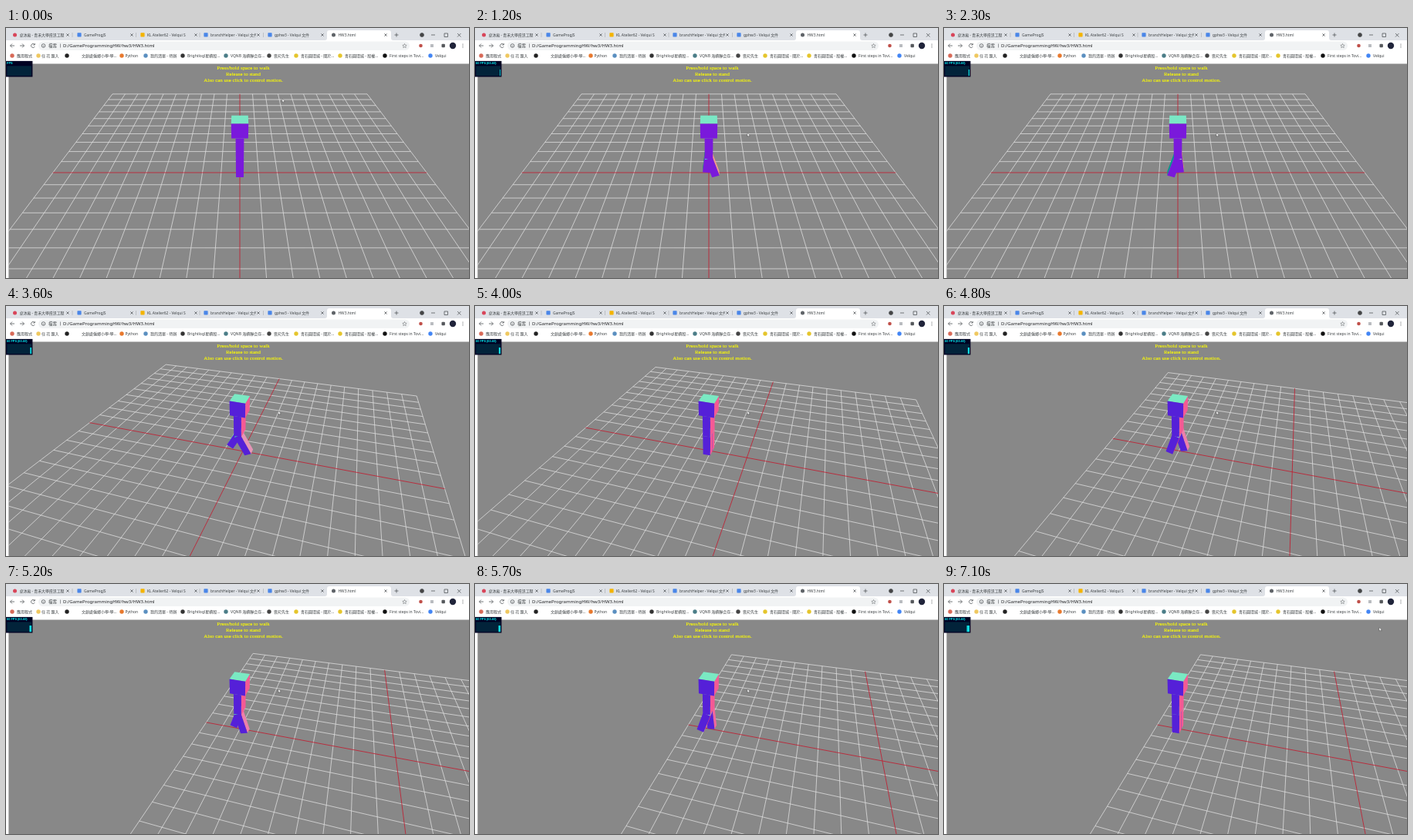
An HTML page with a canvas that plays this animation: 600x325 px, repeating every 7.2 s.

```html
<!DOCTYPE html>
<html lang="zh-Hant">
<head>
<meta charset="utf-8">
<title>HW3</title>
<style>
html, body { margin: 0; width: 600px; height: 325px; overflow: hidden; background: #fff; }
canvas, svg { position: absolute; left: 0; top: 0; display: block; }
text { white-space: pre; }
.ui { font: 5.4px "Noto Sans", "Noto Sans CJK TC", "Noto Sans CJK", sans-serif; fill: #3c4043; }
.tabs { font-size: 4.9px; }
.marks { font-size: 5px; }
.path { font-size: 6px; fill: #202124; }
.help { font: 6.95px "Liberation Serif", "Noto Serif", serif; fill: #ff0; stroke: #ff0; stroke-width: .12; text-anchor: middle; }
.fps { font: bold 3.9px "Liberation Sans", Arial, sans-serif; fill: #0ff; }
.line { fill: none; stroke: #55585c; stroke-width: .8; }
</style>
</head>
<body>
<canvas id="scene" width="600" height="325"></canvas>
<svg width="600" height="325" viewBox="0 0 600 325">
  <rect width="600" height="16" fill="#dee1e6"/>
  <path d="M413 16q3 0 3-3V6q0-3 3-3h77q3 0 3 3v7q0 3 3 3z" fill="#fff"/>
  <g id="tabs" class="ui tabs"></g>
  <g class="line">
    <path d="M503.500 9h5M506 6.500v5M551 9h5M568 7h4.500v4.500h-4.500zM585 7l4.500 4.500m0-4.500l-4.500 4.500"/>
    <path d="M86 6v6M168.500 6v6M251 6v6M333.500 6v6" stroke="#9a9da2" stroke-width=".5"/>
    <circle cx="539" cy="9" r="2.500" fill="#444"/>
  </g>
  <rect x="42" y="17.500" width="481" height="11.500" rx="5.700" fill="#f1f3f4"/>
  <g class="line">
    <path d="M11 23H5.500m2.500-2.500L5.500 23l2.500 2.500M18 23h5.500m-2.500-2.500l2.500 2.500l-2.500 2.500M37 21.500a2.500 2.500 0 1 0 .3 2.500M37.300 20v2h-2"/>
    <circle cx="48.500" cy="23" r="2.300"/>
    <path d="M48.500 22.500v2M70.500 20.500v5" stroke-width=".6"/>
    <path d="M516.500 20.500l.8 1.700 1.900.2-1.400 1.300.4 1.900-1.700-1-1.700 1 .4-1.900-1.400-1.300 1.900-.2z" stroke-width=".5"/>
  </g>
  <circle cx="537.500" cy="23" r="2.300" fill="#c0504a"/>
  <rect x="550" y="21" width="4" height="4" fill="#b9bcc0"/>
  <rect x="564.500" y="20.800" width="4.400" height="4.400" rx="1" fill="#55585c"/>
  <circle cx="579" cy="23" r="4.200" fill="#20243a"/>
  <g fill="#55585c"><circle cx="592" cy="21" r=".6"/><circle cx="592" cy="23" r=".6"/><circle cx="592" cy="25" r=".6"/></g>
  <text class="ui" x="55" y="25.200">檔案</text>
  <text class="ui path" x="74" y="25.200">D:/GameProgrammingHW/hw3/HW3.html</text>
  <g id="marks" class="ui marks"></g>
  <g class="help">
    <text x="307.500" y="53.700">Press/hold space to walk</text>
    <text x="307.500" y="62">Release to stand</text>
    <text x="307.500" y="70.200">Also can use click to control motion.</text>
  </g>
  <rect y="42.900" width="34.400" height="20.600" fill="#002"/>
  <rect x="1.300" y="49.300" width="31.800" height="12.900" fill="#02233a"/>
  <text id="fps" class="fps" x="1" y="46.900">FPS</text>
  <rect id="bar" y="54" height="8.200" fill="#10dce0"/>
  <path id="cursor" d="M0 0v4.600l1.100-1 .8 1.700.8-.4-.8-1.600h1.500z" fill="#fff" stroke="#333" stroke-width=".35"/>
</svg>
<script>
const $ = id => document.getElementById(id);
const ctx = $('scene').getContext('2d');
const NS = 'http://www.w3.org/2000/svg';
const LOOP = 7200, FOCAL = 407, CX = 303, CY = 188, HIP = 12, SWITCH = 2400;
const LEFT = 3.4, TOP = 46.4, RED = '#c4182c';
const rad = deg => deg * Math.PI / 180;
const clamp = (v, lo, hi) => Math.min(hi, Math.max(lo, v));

function add(parent, tag, attrs, label) {
  const el = document.createElementNS(NS, tag);
  for (const k in attrs) el.setAttribute(k, attrs[k]);
  if (label) el.textContent = label;
  parent.append(el);
}

// icon x, icon colour, title, close x
[
  [11.5, '#d8455a', '卓沐嵐 - 青禾大學資訊工程', 80],
  [95, '#4a86e8', 'GameProgJS', 163],
  [177, '#f4b400', 'KL Atelier62 - Velqui S', 246],
  [259, '#4a86e8', 'branchHelper - Velqui 文件', 327],
  [342, '#4a86e8', 'gphw3 - Velqui 文件', 410],
  [424.5, '#5f6368', 'HW3.html', 492]
].forEach(([x, fill, label, close], i) => {
  const g = $('tabs');
  if (i % 5) add(g, 'rect', { x: x - 2.6, y: 6.3, width: 5.2, height: 5.2, rx: .7, fill });
  else add(g, 'circle', { cx: x, cy: 9, r: 2.5, fill });
  add(g, 'text', { x: x + 6, y: 10.9 }, label);
  if (i < 5) add(g, 'rect', { x: close - 3, y: 4, width: 8, height: 10, fill: '#dee1e6' });
  add(g, 'path', { class: 'line', d: `M${close - 1.6} 7.400l3.200 3.200m0-3.200l-3.200 3.200` });
});

// icon x, icon colour, text x, title
[
  [8, '#d86a58', 14, '應用程式'],
  [42, '#efc860', 46, '任 花 匯入'],
  [79, '#222', 0, ''],
  [0, '', 98, '文創處偏鄉小學-學...'],
  [150, '#e8792e', 154.5, 'Python'],
  [181, '#5a8fc0', 187, '我的清單 - 待辦'],
  [229, '#333', 235, 'Brightlog!星嶼股...'],
  [285, '#4b7d88', 291, 'VQNB 海嶼聯合存...'],
  [341, '#444', 347, '雲尺先生'],
  [376, '#e5c52c', 382, '青石圓環城 - 關於...'],
  [433, '#e5c52c', 439, '青石圓環城 - 股權...'],
  [491, '#111', 497, 'First steps in Tovi...'],
  [550, '#4285f4', 556, 'Velqui']
].forEach(([x, fill, tx, label]) => {
  const g = $('marks');
  if (x) add(g, 'circle', { cx: x, cy: 36, r: 2.7, fill });
  if (label) add(g, 'text', { x: tx, y: 38 }, label);
});

// Camera at (x, y, z) aimed at the walker's feet.
function makeCamera(x, y, z) {
  const flat = Math.hypot(x, z), dist = Math.hypot(flat, y);
  const [c, s, ct, st] = [z / flat, x / flat, flat / dist, y / dist];
  const view = ([px, py, pz]) => {
    const away = -px * s - pz * c;
    return [px * c - pz * s, py * ct + away * st, py * st - away * ct];
  };
  const project = p => {
    const [r, u, n] = view(p), k = FOCAL / (dist - n);
    return [CX + r * k, CY - u * k];
  };
  return { view, project };
}
const front = makeCamera(0, 104, 132);
const turned = makeCamera(41, 104, 132);

function segment(cam, a, b, color) {
  ctx.strokeStyle = color;
  ctx.beginPath();
  ctx.moveTo(...cam.project(a));
  ctx.lineTo(...cam.project(b));
  ctx.stroke();
}

function drawGrid(cam, shift) {
  ctx.lineWidth = .8;
  for (const color of ['#dedede', RED]) {
    for (let k = -100; k <= 100; k += 10) {
      if ((k === 0) !== (color === RED)) continue;
      segment(cam, [shift - 100, 0, k], [shift + 100, 0, k], color);
      segment(cam, [shift + k, 0, -100], [shift + k, 0, 100], color);
    }
  }
}

// Box swung by `angle` about the z axis through the hip, coloured by view normal.
function drawBox(cam, [x0, x1], [y0, y1], [z0, z1], angle = 0) {
  const c = Math.cos(angle), s = Math.sin(angle);
  const turn = ([x, y, z]) => [x * c + y * s, y * c - x * s, z];
  const place = p => {
    const [x, y, z] = turn([p[0], p[1] - HIP, p[2]]);
    return cam.project([x, y + HIP, z]);
  };
  const faces = [
    [[-1, 0, 0], [[x0, y0, z0], [x0, y0, z1], [x0, y1, z1], [x0, y1, z0]]],
    [[1, 0, 0], [[x1, y0, z1], [x1, y0, z0], [x1, y1, z0], [x1, y1, z1]]],
    [[0, -1, 0], [[x0, y0, z0], [x1, y0, z0], [x1, y0, z1], [x0, y0, z1]]],
    [[0, 1, 0], [[x0, y1, z1], [x1, y1, z1], [x1, y1, z0], [x0, y1, z0]]],
    [[0, 0, 1], [[x0, y0, z1], [x1, y0, z1], [x1, y1, z1], [x0, y1, z1]]]
  ];
  const tone = v => Math.round(clamp(127.5 * (1 + v), 0, 255));
  for (const [normal, corners] of faces) {
    const q = corners.map(place);
    const area = (q[2][0] - q[0][0]) * (q[3][1] - q[1][1]) - (q[2][1] - q[0][1]) * (q[3][0] - q[1][0]);
    if (area >= 0) continue;
    const [r, u, n] = cam.view(turn(normal));
    ctx.fillStyle = `rgb(${tone(r - .04)},${tone(u * 1.15 - .09)},${tone(n - .07)})`;
    ctx.beginPath();
    q.forEach(p => ctx.lineTo(...p));
    ctx.fill();
  }
}

const MOVE_START = 3565, MOVE_END = 5361;
const moved = t => .049 * (clamp(t, MOVE_START, MOVE_END) - MOVE_START);

// Angles of the near and far leg.
function stride(t) {
  if (t < 500 || t >= 6500) return [0, 0];
  const lag = t > MOVE_END ? 250 : 0;
  const near = -rad(30) * Math.sin((t - lag) / 500 * 2 * Math.PI);
  const inPlace = t < SWITCH || t > MOVE_END;
  return [near, -near * (inPlace ? .35 : 1)];
}

function cursorAt(t) {
  if (t < 6500) {
    const k = clamp((t - 100) / 600, 0, 1);
    return [358 - 5 * k, 92 + 44.5 * k];
  }
  const k = clamp((t - 6500) / 500, 0, 1), e = k * k * (3 - 2 * k);
  return [353 + 211 * e, 136.5 - 80 * e];
}

function draw(t) {
  const cam = t < SWITCH ? front : turned;
  ctx.clearRect(0, 0, 600, 325);
  ctx.save();
  ctx.beginPath();
  ctx.rect(LEFT, TOP, 600, 325);
  ctx.clip();
  ctx.fillStyle = '#888';
  ctx.fillRect(0, 0, 600, 325);
  drawGrid(cam, moved(t));
  const [near, far] = stride(t);
  drawBox(cam, [-2, 2], [0, HIP], [-4, 0], far);
  drawBox(cam, [-2, 2], [0, HIP], [0, 4], near);
  drawBox(cam, [-2, 2], [HIP, 24], [-4, 4]);
  drawBox(cam, [-4, 4], [24, 32], [-4, 4]);
  ctx.restore();

  $('fps').textContent = t < 100 ? 'FPS' : '60 FPS (60-60)';
  const width = t < 1000 ? 0 : .45 * (1 + Math.floor(t / 1000));
  $('bar').setAttribute('x', 33.1 - width);
  $('bar').setAttribute('width', width);
  $('cursor').setAttribute('transform', `translate(${cursorAt(t)})`);
}

const start = performance.now();
function tick() {
  const t = (performance.now() - start) % LOOP;
  draw(Math.floor(t / 100) * 100);
  requestAnimationFrame(tick);
}
tick();
</script>
</body>
</html>
```
